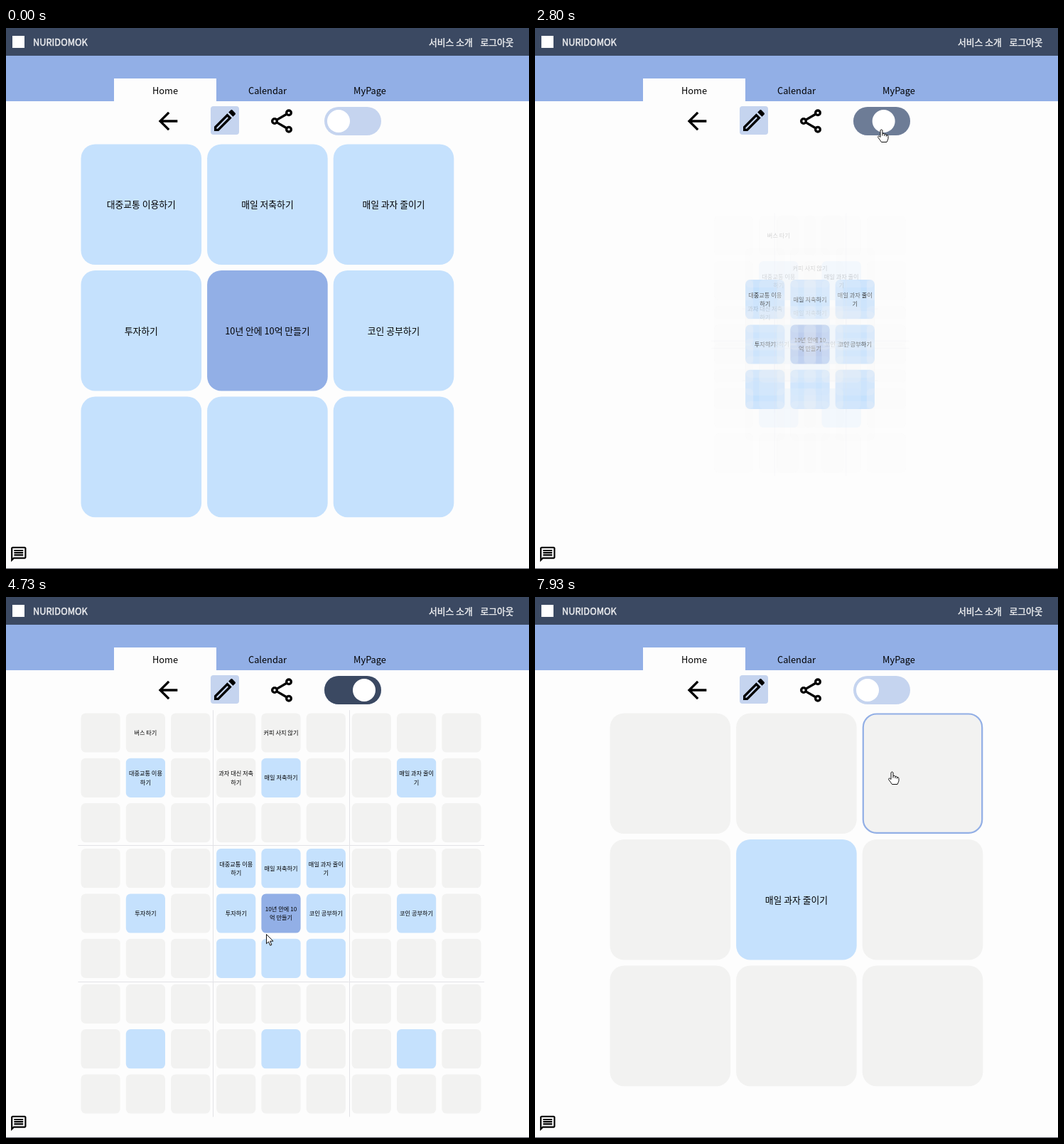
Animation, 736 px wide and 761 px high, one loop 8 s. Source, as an HTML page with a canvas:

```html
<!DOCTYPE html>
<html lang="ko">
<head>
<meta charset="utf-8">
<style>
html, body { margin: 0; width: 100%; height: 100%; overflow: hidden; background: #fdfdfd; }
canvas { display: block; }
</style>
</head>
<body>
<canvas id="stage" width="736" height="761"></canvas>
<script>
const ctx = document.getElementById('stage').getContext('2d');
const LOOP = 8000, OPEN = 2655, PICK = 7540;
const PAPER = '#fdfdfd', NAVY = '#3b4962', BLUE = '#92afe6', SKY = '#c5e1fd',
      GREY = '#f2f2f1', PALE = '#c5d4ef', EDGE = '#c5c6c8', LINE = '#e2e2e6';
const FAMILY = '"Noto Sans CJK KR", "Noto Sans CJK", "Noto Sans", sans-serif';

// '|' marks the line break used in small cells
const GOALS = ['대중교통 이용|하기', '매일 저축하기', '매일 과자 줄이|기',
               '투자하기', '10년 안에 10|억 만들기', '코인 공부하기', '', '', ''];
const TASKS = { 0: { 1: '버스 타기' }, 1: { 1: '커피 사지 않기', 3: '과자 대신 저축|하기' } };

// pointer stops: time, x, y
const STOPS = [
  [800, 300, 120], [1000, 190, 260], [1150, 200, 410], [1280, 380, 400], [1400, 531, 356],
  [1600, 540, 300], [1720, 370, 230], [1830, 190, 260], [1930, 200, 400], [2070, 210, 400],
  [2250, 380, 410], [2400, 540, 300], [2530, 487, 142], [3480, 487, 142], [3600, 500, 210],
  [3900, 540, 320], [4330, 400, 260], [4730, 367, 474], [4950, 95, 480], [5200, 190, 640],
  [5500, 380, 630], [5750, 590, 450], [5880, 570, 320], [6000, 475, 389], [6350, 560, 260],
  [6930, 502, 245]
];

const ICONS = {
  back: new Path2D('M20 11H7.83l5.59-5.59L12 4l-8 8 8 8 1.41-1.41L7.83 13H20z'),
  edit: new Path2D('M14.06 9.02l.92.92L5.92 19H5v-.92l9.06-9.06M17.66 3c-.25 0-.51.1-.7.29l-1.83 1.83 3.75 3.75 1.83-1.83c.39-.39.39-1.02 0-1.41l-2.34-2.34c-.2-.2-.45-.29-.71-.29zm-3.6 3.19L3 17.25V21h3.75L17.81 9.94l-3.75-3.75z'),
  chat: new Path2D('M4 4h16v12H5.17L4 17.17V4m0-2c-1.1 0-1.99.9-1.99 2L2 22l4-4h14c1.1 0 2-.9 2-2V4c0-1.1-.9-2-2-2H4zm2 10h12v2H6v-2zm0-3h12v2H6V9zm0-3h12v2H6V6z')
};
const ARROW = new Path2D('M0 0V13.2L3 10.4L5.3 15.6L7.4 14.7L5.2 9.6H9.5Z');
const HAND = new Path2D('M-1.5 1.5Q0-1 1.5 1.5V6Q4 5 4.5 7Q6.5 6 7 8Q9.5 7.5 9.5 10V13Q9 15 7.5 18H0Q-2 15-5 11Q-4.5 8-1.5 11Z');

const clamp = v => Math.min(1, Math.max(0, v));

// CSS "ease": cubic-bezier(.25, .1, .25, 1)
function ease(x) {
  x = clamp(x);
  if (x === 0 || x === 1) return x;
  const bez = (a, b, u) => 3 * a * u * (1 - u) ** 2 + 3 * b * u * u * (1 - u) + u ** 3;
  let lo = 0, hi = 1;
  for (let i = 0; i < 24; i++) {
    const mid = (lo + hi) / 2;
    if (bez(.25, .25, mid) < x) lo = mid; else hi = mid;
  }
  return bez(.1, 1, lo);
}

function pointerAt(t) {
  if (t < STOPS[0][0]) return null;
  const i = STOPS.findIndex(s => s[0] > t);
  if (i < 0) { const [, x, y] = STOPS[STOPS.length - 1]; return { x, y }; }
  const [t0, x0, y0] = STOPS[i - 1], [t1, x1, y1] = STOPS[i];
  const k = (t - t0) / (t1 - t0);
  return { x: x0 + (x1 - x0) * k, y: y0 + (y1 - y0) * k };
}

function rect(x, y, w, h, fill) {
  ctx.fillStyle = fill;
  ctx.fillRect(x, y, w, h);
}

function round(x, y, w, h, r, fill) {
  ctx.beginPath();
  ctx.roundRect(x, y, w, h, r);
  ctx.fillStyle = fill;
  ctx.fill();
}

function disc(x, y, r, fill) {
  ctx.beginPath();
  ctx.arc(x, y, r, 0, 7);
  ctx.fillStyle = fill;
  ctx.fill();
}

// "heavy" thickens the strokes to a medium weight
function text(str, x, y, { size = 12.8, heavy = 0, fill = '#000', align = 'center' } = {}) {
  ctx.font = `${size}px ${FAMILY}`;
  ctx.textAlign = align;
  ctx.fillStyle = ctx.strokeStyle = fill;
  ctx.fillText(str, x, y + size * .38);
  if (!heavy) return;
  ctx.lineWidth = heavy;
  ctx.strokeText(str, x, y + size * .38);
}

function icon(path, x, y, size) {
  ctx.save();
  ctx.translate(x, y);
  ctx.scale(size / 24, size / 24);
  ctx.fillStyle = '#000';
  ctx.fill(path, 'evenodd');
  ctx.restore();
}

function shareIcon(x, y, size) {
  ctx.save();
  ctx.translate(x, y);
  ctx.scale(size / 24, size / 24);
  ctx.lineWidth = 2;
  ctx.strokeStyle = '#000';
  ctx.beginPath();
  for (const [cx, cy] of [[18, 5], [6, 12], [18, 19]]) {
    ctx.moveTo(cx + 2, cy);
    ctx.arc(cx, cy, 2, 0, Math.PI * 2);
  }
  for (const s of [-1, 1]) {
    ctx.moveTo(8.2, 12 + s * 1.3);
    ctx.lineTo(15.8, 12 + s * 5.7);
  }
  ctx.stroke();
  ctx.restore();
}

const inside = (p, x, y, w, h) => p && p.x >= x && p.x < x + w && p.y >= y && p.y < y + h;

function cell(x, y, s, r, fill, label, size, hot) {
  round(x, y, s, s, r, fill);
  if (hot) {
    ctx.beginPath();
    ctx.roundRect(x + 1.1, y + 1.1, s - 2.2, s - 2.2, r - 1);
    ctx.lineWidth = 2.2;
    ctx.strokeStyle = fill === GREY ? BLUE : EDGE;
    ctx.stroke();
  }
  if (!label) return;
  const lines = label.split('|');
  lines.forEach((line, i) =>
    text(line, x + s / 2, y + s / 2 + (i - (lines.length - 1) / 2) * 12.2, { size }));
}

function bigGrid(labels, fills, p) {
  for (let i = 0; i < 9; i++) {
    const x = 105.5 + i % 3 * 177.6, y = 163.4 + Math.floor(i / 3) * 177.6;
    const label = (labels[i] || '').replace('|', '');
    cell(x, y, 169.6, 20, fills(i), label, 12.8, inside(p, x, y, 169.6, 169.6));
  }
}

function group(g, p) {
  const col = g % 3, row = Math.floor(g / 3);
  const left = 101.3 + col * 190.6, top = 159.2 + row * 190.7;
  if (col !== 1) rect(col ? Math.round(left) : Math.round(left + 190.6) - 1, top, 1, 190.7, LINE);
  if (row !== 1) rect(left, row ? Math.round(top) : Math.round(top + 190.7) - 1, 190.6, 1, LINE);
  for (let i = 0; i < 9; i++) {
    const x = left + 4.2 + i % 3 * 63.3, y = top + 4.2 + Math.floor(i / 3) * 63.3;
    let fill = GREY, label = (TASKS[g] || {})[i];
    if (g === 4) { fill = i === 4 ? BLUE : SKY; label = GOALS[i]; }
    else if (i === 4) { fill = SKY; label = GOALS[g]; }
    cell(x, y, 55.2, 6.5, fill, label, 8.2, inside(p, x, y, 55.2, 55.2));
  }
}

// outer groups slide out of the centre while fading in
function fullChart(t, p) {
  const k = ease((t - OPEN) / 1000), hover = k === 1 ? p : null;
  group(4, hover);
  for (let g = 0; g < 9; g++) {
    if (g === 4) continue;
    const dx = 1 - g % 3, dy = 1 - Math.floor(g / 3);
    ctx.save();
    ctx.globalAlpha = k;
    ctx.translate(dx * 178 * (1 - k), dy * (dx ? 123 : 178) * (1 - k));
    group(g, hover);
    ctx.restore();
  }
}

function frameParts() {
  rect(0, 0, 736, 761, PAPER);
  rect(0, 0, 736, 39, NAVY);
  rect(0, 39, 736, 64, BLUE);
  rect(152, 71, 144, 32, PAPER);
  rect(0, 760, 736, 1, '#5a5c66');
  rect(9, 11, 17, 17, '#fff');
  const bar = { heavy: .4, fill: '#f0f1f3', align: 'left' };
  text('NURIDOMOK', 38, 20, bar);
  text('서비스 소개', 595, 20, bar);
  text('로그아웃', 667.5, 20, bar);
  ['Home', 'Calendar', 'MyPage'].forEach((s, i) => text(s, 224 + i * 144, 88));
  icon(ICONS.back, 208, 111, 40);
  round(288, 110, 40, 40, 4, PALE);
  icon(ICONS.edit, 288, 110, 40);
  shareIcon(368, 111, 40);
  icon(ICONS.chat, 5, 727.5, 25.6);
}

function toggle(t) {
  const on = ease((t - OPEN) / 400) - ease((t - PICK) / 400);
  round(448, 111, 80, 40, 20, PALE);
  ctx.globalAlpha = on;
  round(448, 111, 80, 40, 20, NAVY);
  ctx.globalAlpha = 1;
  disc(468 + 36 * on, 131, 16, '#fff');
}

function cursorKind(t, p) {
  if (inside(p, 448, 111, 80, 40)) return 'hand';
  if (t >= PICK) return 'hand';
  if (t < OPEN) {
    const x = (p.x - 105.5) % 177.6, y = (p.y - 163.4) % 177.6;
    return Math.abs(y - 85) < 10 && Math.abs(x - 85) < 55 && p.x > 105 && p.y < 511 ? 'text' : 'arrow';
  }
  if (inside(p, 292, 350, 190, 190)) {
    const y = (p.y - 353.5) % 63.3;
    return p.y < 472 && y > 15 && y < 42 ? 'text' : 'arrow';
  }
  return inside(p, 101, 159, 571, 571) ? 'hand' : 'arrow';
}

function drawCursor(t, p) {
  const kind = cursorKind(t, p);
  ctx.save();
  ctx.translate(Math.round(p.x) + .5, Math.round(p.y) + .5);
  ctx.lineWidth = 1;
  ctx.strokeStyle = '#111';
  if (kind === 'text') {
    ctx.stroke(new Path2D('M-3-7H3M0-7V6M-3 6H3'));
  } else {
    const shape = kind === 'hand' ? HAND : ARROW;
    ctx.fillStyle = '#fff';
    ctx.fill(shape);
    ctx.stroke(shape);
    if (kind === 'hand') ctx.stroke(new Path2D('M1.5 6V9M4.5 7V9.5M7 8V10'));
  }
  ctx.restore();
}

function draw(t) {
  const p = pointerAt(t);
  frameParts();
  toggle(t);
  if (t < OPEN) bigGrid(GOALS, i => i === 4 ? BLUE : SKY, p);
  else if (t < PICK) fullChart(t, p);
  else bigGrid({ 4: GOALS[2] }, i => i === 4 ? SKY : GREY, p);
  if (p) drawCursor(t, p);
}

const start = performance.now();
function tick() {
  draw((performance.now() - start) % LOOP);
  requestAnimationFrame(tick);
}
tick();
</script>
</body>
</html>
```
